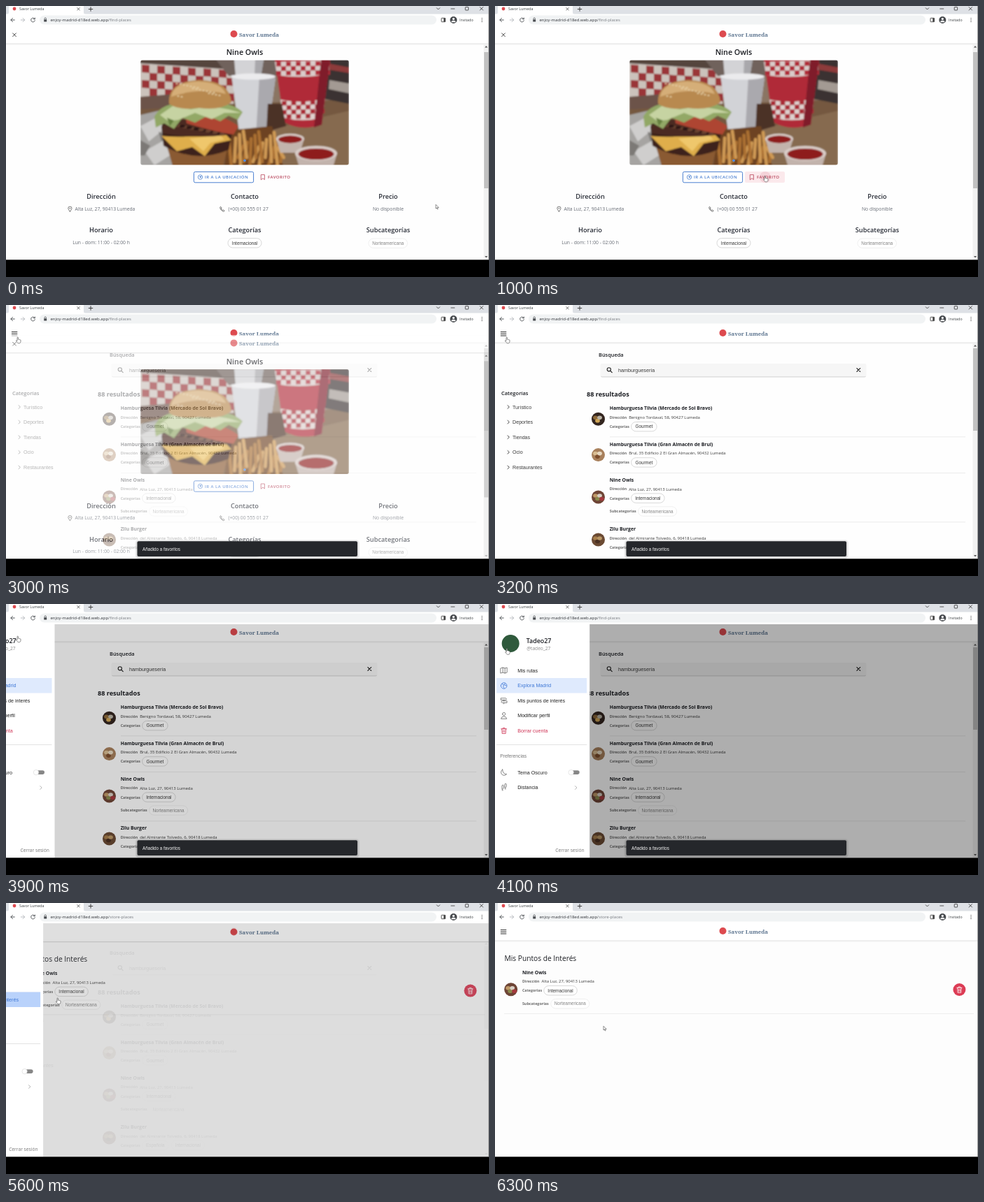
An HTML page that plays this animation: 690 px wide and 388 px high, repeating every 7 s.

```html
<!DOCTYPE html>
<html lang="es">
<head>
<meta charset="utf-8">
<title>Savor Lumeda</title>
<style>
html, body { margin: 0; width: 100%; height: 100%; overflow: hidden; background: #fff; }
svg { display: block; width: 100vw; height: 100vh; }
text { font-family: "Open Sans", "Noto Sans", sans-serif; white-space: pre; }
.ar { font-family: "Liberation Sans", Arial, sans-serif; }
.logo { font-family: "Noto Serif", serif; font-weight: 700; }
.sb { font-weight: 600; }
.bd { font-weight: 700; }
.ln { fill: none; stroke-linecap: round; stroke-linejoin: round; }
</style>
</head>
<body>
<svg id="stage" viewBox="0 0 690 388" preserveAspectRatio="none"></svg>
<script>
const stage = document.getElementById('stage');

// Markup helpers
const text = (x, y, size, str, cls = '', fill = '#1b1d22', more = '') =>
  `<text x="${x}" y="${y}" font-size="${size}" class="${cls}" fill="${fill}" ${more}>${str}</text>`;
const mid = (x, y, size, str, cls, fill) => text(x, y, size, str, cls, fill, 'text-anchor="middle"');
const rect = (x, y, w, h, fill, r = 0, more = '') =>
  `<rect x="${x}" y="${y}" width="${w}" height="${h}" rx="${r}" fill="${fill}" ${more}/>`;
const disc = (x, y, r, fill, more = '') => `<circle cx="${x}" cy="${y}" r="${r}" fill="${fill}" ${more}/>`;
const oval = (x, y, rx, ry, fill) => `<ellipse cx="${x}" cy="${y}" rx="${rx}" ry="${ry}" fill="${fill}"/>`;
const line = (d, color = '#222', w = 1) => `<path class="ln" d="${d}" stroke="${color}" stroke-width="${w}"/>`;
const shape = (d, fill) => `<path d="${d}" fill="${fill}"/>`;
const group = (id, body) => `<g id="${id}">${body}</g>`;
const cross = (x, y, r, color, w) => line(`M${x - r} ${y - r}l${2 * r} ${2 * r}m0 ${-2 * r}l${-2 * r} ${2 * r}`, color, w);

function chip(x, y, w, label, soft) {
  return rect(x, y, w, 13.4, '#fff', 6.7, `stroke="${soft ? '#ebebeb' : '#cfcfcf'}" stroke-width=".8"`) +
    mid(x + w / 2, y + 9, 6.35, label, 'ar', soft ? '#858585' : '#383838');
}

function browser() {
  let s = rect(0, 0, 690, 12, '#dee1e6') + rect(0, 11.5, 690, 17.5, '#fff');
  s += shape('M1 12Q4 12 4 9V0H111V9Q111 12 114 12Z', '#fff');
  s += disc(12, 4, 2.4, '#dd4a4f') + text(19, 6.2, 5.3, 'Savor Lumeda', '', '#3c4043');
  s += cross(103.5, 4.3, 1.7, '#444', .8) + line('M118.2 4.5h5.6M121 1.7v5.6', '#333', .9);
  s += line('M615.3 2.8l2.2 2.2 2.2-2.2M635.8 4h5', '#333', .8);
  s += rect(656.2, 1.6, 4.4, 4.4, 'none', .5, 'stroke="#333" stroke-width=".8"') + cross(679.3, 3.8, 2.2, '#333', .8);
  s += line('M12.3 20H7m2.5-2.6L6.9 20l2.6 2.6', '#45484c', .9);
  s += line('M21.3 20h5.4m-2.6-2.6l2.6 2.6-2.6 2.6', '#b3b6ba', .9);
  s += line('M41 18.4a2.9 2.9 0 1 0 .4 2.3M41.3 17v1.8h-1.8', '#45484c', .9);
  s += rect(48, 13.5, 567, 13, '#f1f3f4', 6.5);
  s += rect(54.2, 19.2, 4, 3.2, '#4a4d51', .5) + line('M55 19v-1a1.2 1.2 0 0 1 2.4 0v1', '#4a4d51', .7);
  s += text(63.5, 22.3, 6.02, 'enjoy-madrid-d18ed.web.app<tspan id="path" fill="#777b80"></tspan>', '', '#303338');
  s += rect(622, 17.3, 5.6, 5.4, 'none', .5, 'stroke="#444" stroke-width=".9"') + rect(625.2, 17.3, 2.4, 5.4, '#444');
  s += disc(639.3, 20, 5, '#46494d') + disc(639.3, 18.4, 1.6, '#fff') + shape('M636.2 23.2a3.1 2.4 0 0 1 6.2 0Z', '#fff');
  s += text(648, 22, 5.2, 'Invitado', '', '#3c4043');
  return s + [17.6, 20, 22.4].map(y => disc(680, y, .7, '#444')).join('');
}

function header(icon) {
  const mark = icon === 'x' ? cross(12, 41.3, 2.4, '#333', .9) : line('M8.3 38.6h7.6M8.3 41.3h7.6M8.3 44h7.6', '#222', 1);
  return rect(0, 29, 690, 25, '#fff') + rect(0, 53.6, 690, .9, '#d6d6d6') + rect(0, 54.5, 690, 1, '#f4f4f4') + mark +
    disc(325.5, 40, 5, '#dd4a4f') + text(333, 43.8, 7.8, 'Savor Lumeda', 'logo', '#5d7590');
}

const scrollbar = (top, h) => rect(682.5, 54.6, 7, 308.4, '#f1f1f1') + rect(683, top, 6, h, '#c1c1c1') +
  shape('M684 59.4l2-2.4 2 2.4Z', '#555') + shape('M684 358l2 2.4 2-2.4Z', '#555');

// Slanted chequerboard: every other cell is filled
function checks(x, y, cols, rows, w, h, slope, color) {
  let d = '';
  for (let r = 0; r < rows; r++)
    for (let c = r % 2; c < cols; c += 2)
      d += `M${x + c * w} ${y + r * h + c * slope}l${w} ${slope}v${h}l${-w} ${-slope}z`;
  return shape(d, color);
}

function photo() {
  // Wall, counter and table
  let s = rect(192, 77, 298, 152, '#8a7464') + shape('M192 77H330V96L192 84Z', '#54443e');
  s += shape('M192 82L325 91V140H192Z', '#cbc2bb') + checks(194, 84, 12, 4, 11, 11, .7, '#9a3538');
  s += shape('M192 130L240 126 240 146 192 152Z', '#6c5249') + shape('M300 77H395V100H318Z', '#6f625c');
  s += shape('M192 148L330 140 490 134V229H192Z', '#74583f') + shape('M380 176L490 150V229H380Z', '#866a50');
  s += shape('M452 77H490V140L450 132Z', '#3a3230') + shape('M459 82l31 6v8l-30-5z', '#8d3a3a') + shape('M462 106l28 5v14l-29-6z', '#a39a93');
  s += shape('M192 156L226 148 240 172 246 229H192Z', '#a6a4a2') + shape('M192 172l26-14 8 18-22 18zM198 208l28-16 8 22-22 14z', '#cfcecd') +
    shape('M192 192l14 8-8 14h-6zM218 180l12 6-8 8z', '#7c7976');
  // Cups
  s += shape('M326 77H368L364 101H328Z', '#d3d3d6') + shape('M356 77h12l-4 24h-9z', '#a9a8ac');
  s += shape('M322 99L385 103 374 181Q352 190 333 180Z', '#d2d3d7') + shape('M362 101l23 2-11 78-17 5z', '#aaa9ae') + oval(353.5, 101, 31.5, 4.5, '#ebebed');
  s += shape('M384 77H463L451 170Q420 180 397 166Z', '#b02c37') + shape('M384 80L463 77 461 97Q424 105 387 99Z', '#d9ccca');
  s += checks(386, 80, 11, 3, 7, 6.5, -.1, '#b02c37');
  s += shape('M392 134Q424 141 456 132L452 160Q424 167 396 160Z', '#ded2cf') + checks(394, 136, 9, 4, 6.8, 6.5, -.2, '#a92a35');
  s += shape('M450 77H463L451 170 440 174Z', '#7f1f29') + shape('M374 140l20 0 6 32-28 8z', '#4b3328');
  // Fries
  s += shape('M318 178L380 172 396 229H312Z', '#6d4320');
  for (let i = 0; i < 18; i++)
    s += line(`M${322 + i * 4.4} ${229 - i % 3 * 6}L${317 + i * 4.2 + i * 7 % 17} ${178 + i * 11 % 27}`, i % 2 ? '#cf9a55' : '#aa6f33', 4.5);
  // Sauce
  for (const [x, y, r] of [[406, 190, 20], [443, 211, 30]])
    s += shape(`M${x - r} ${y}L${x - r * .7} ${y + r}H${x + r * .7}L${x + r} ${y}Z`, '#c2b3ac') + oval(x, y, r, r * .36, '#d9cdc8') + oval(x, y + 1, r * .85, r * .27, '#8e1a1f');
  // Burger
  s += shape('M230 200Q272 216 318 198L310 229H238Z', '#8a5a30');
  s += shape('M222 172Q270 160 324 178L318 206Q270 226 225 200Z', '#3c231a');
  s += shape('M222 186Q254 190 312 182L322 192 298 197 284 215 266 202 244 208Z', '#dfae4c') + shape('M262 190l44-5 6 6-20 5-10 12z', '#efc76c');
  s += shape('M222 164Q276 158 320 174L314 185Q268 190 224 182Z', '#4b2c20');
  for (let i = 0; i < 16; i++) s += oval(228 + i * 37 % 84, 168 + i * 7 % 16, 4, 2, i % 2 ? '#6b4331' : '#2c1913');
  s += shape('M256 154Q306 151 332 172L325 184Q298 180 258 168Z', '#ae4530');
  s += shape('M212 158Q224 135 270 138 320 134 338 152L331 163 318 157 306 165 288 157 270 167 252 160 240 176 226 168 214 174Z', '#92a866');
  s += shape('M220 156l20-14 24 6 26-5 28 5 18 5-24 0-18 9-24-9-24 10-14 2z', '#c6d3a2') + shape('M230 160l10 4-6 8z', '#66803f');
  s += shape('M233 140Q230 108 276 106 320 107 322 138 306 150 276 146 246 150 233 140Z', '#b88950') + shape('M236 130Q238 110 274 108 308 109 314 126 276 116 236 130Z', '#d5ae78');
  for (let i = 0; i < 20; i++) s += oval(244 + i * 23 % 64, 111 + i * 7 % 20, 1.5, .9, '#e8d2a8');
  return `<clipPath id="frame">${rect(192, 77.5, 298, 150, '#000', 3)}</clipPath>
    <filter id="soft"><feGaussianBlur stdDeviation="1"/></filter>
    <g clip-path="url(#frame)"><g filter="url(#soft)">${s}</g></g>` + disc(341, 221.3, 1.8, '#4d8df0');
}

function detail() {
  const grey = '#666b74', blue = '#4a7fd0', red = '#b8445a';
  let s = rect(0, 29, 690, 334, '#fefefe') + header('x') + scrollbar(66, 195) + mid(341, 70.3, 10.75, 'Nine Owls', 'sb') + photo();
  s += rect(268.4, 237.4, 85.2, 15.4, '#fff', 2, `stroke="${blue}" stroke-width="1"`);
  s += disc(277.5, 245, 3.2, 'none', `stroke="${blue}" stroke-width=".8"`) + shape('M279.3 243.2l-1.2 3.6-.8-1.6-1.6-.8z', blue);
  s += text(284, 247.2, 6, 'IR A LA UBICACIÓN', 'sb', blue, 'letter-spacing=".45"');
  s += rect(357, 237, 57, 16, '#fbe9ec', 2, 'id="hover"') + disc(386, 245, 8, '#e9a9b5', 'id="ripple"');
  s += line('M364.6 241.6h4.8v7l-2.4-1.9-2.4 1.9z', red, .8) + text(374, 247.2, 6, 'FAVORITO', 'sb', red, 'letter-spacing=".45"');
  [['Dirección', 'Contacto', 'Precio'], ['Horario', 'Categorías', 'Subcategorías']].forEach((row, r) =>
    row.forEach((label, c) => s += mid(136 + c * 205, 276.2 + r * 48, 9.2, label, 'sb', '#272b35')));
  s += line('M91.4 294.2q-2.6-3.1-2.6-4.5a2.6 2.6 0 0 1 5.2 0q0 1.4-2.6 4.5z', '#555', .8) + disc(91.4, 289.8, .8, '#555');
  s += text(98.5, 293, 6.75, 'Alta Luz, 27, 90413 Lumeda', '', grey);
  s += line('M306 287.6q-1.2 1 .6 3.5t4 3.2q1 .1 1.5-1.2l-1.5-1.2-1.1.7q-1.8-1.2-2.2-2.6l.7-.8z', '#555', .8);
  s += text(317.5, 293, 6.75, '(+00) 00 555 01 27', '', grey) + mid(546, 293, 6.8, 'No disponible', '', grey);
  s += mid(136, 341, 6.75, 'Lun - dom: 11:00 - 02:00 h', '', grey);
  return s + chip(317, 332.6, 48, 'Internacional') + chip(518, 333, 55.5, 'Norteamericana', true);
}

// Round thumbnail: base tone plus a few blobs
function thumb(x, y, tones) {
  let s = disc(x, y, 9.5, tones[0]);
  tones.slice(1).forEach((c, i) => s += oval(x - 4 + i * 3, y + (i % 2 ? 2.5 : -2), 3.4, 2.8, c));
  return s;
}

function place(y, name, address, chips, sub, tones) {
  let s = text(163.7, y + 2.4, 6.8, name, 'bd') + thumb(147.5, y + (sub ? 24.5 : 15.3), tones);
  s += text(163.7, y + 14.8, 5.25, 'Dirección', 'bd', '#6a6a6a') + text(191.2, y + 15, 5.95, address, '', '#3a3a3a');
  s += text(163.7, y + 28, 5.3, 'Categorías', 'bd', '#6a6a6a');
  let x = 194.6;
  for (const [label, w] of chips) { s += chip(x, y + 19.4, w, label); x += w + 4; }
  if (sub) s += text(163.7, y + 46.8, 5.4, 'Subcategorías', 'bd', '#6a6a6a') + chip(204.6, y + 38.3, 55, sub, true);
  return s;
}

const owls = y => place(y, 'Nine Owls', 'Alta Luz, 27, 90413 Lumeda', [['Internacional', 47.5]], 'Norteamericana', ['#6e4536', '#c09a68', '#8b8a4c', '#d8cfc4', '#a5393d']);

function list() {
  let s = rect(0, 29, 690, 334, '#fefefe') + header('menu') + scrollbar(62, 118);
  s += text(148, 73.6, 7.4, 'Búsqueda', 'sb');
  s += rect(151, 85, 379, 18.5, '#d9d9d9', 2) + rect(150.5, 84, 380, 18.3, '#f6f6f6', 2);
  s += disc(162.8, 92.3, 2.6, 'none', 'stroke="#222" stroke-width="1.1"') + line('M164.8 94.3l2.4 2.4', '#222', 1.2);
  s += text(176, 95.8, 7.2, 'hamburguesería', 'ar', '#3a3a3a') + cross(519.3, 93, 2.4, '#222', 1.2);
  s += text(9, 129, 7.5, 'Categorías', 'sb');
  ['Turístico', 'Deportes', 'Tiendas', 'Ocio', 'Restaurantes'].forEach((label, i) => {
    const y = 146 + i * 21.6;
    s += line(`M18 ${y - 2.3}l2.4 2.3-2.4 2.3`, '#333', .9) + text(25, y + 2.6, 7.15, label, 'ar', '#3a3a3a');
  });
  s += text(131, 130.5, 9.1, '88 resultados', 'bd');
  s += place(148, 'Hamburguesa Tilvia (Mercado de Sol Bravo)', 'Benigno Tordaval, 58, 90427 Lumeda', [['Gourmet', 36.5]], '', ['#33251f', '#8e6a3a', '#d0a657', '#b9b2a5']);
  s += place(199.3, 'Hamburguesa Tilvia (Gran Almacén de Brul)', 'Brul, 35 Edificio 2 El Gran Almacén, 90432 Lumeda', [['Gourmet', 36.5]], '', ['#a8805c', '#d9bd92', '#7d4d2c', '#e6d8c2']);
  s += owls(250.5);
  s += place(320.7, 'Zilu Burger', 'del Almirante Tolvedo, 6, 90418 Lumeda', [['Española', 37.5], ['Internacional', 47.5]], '', ['#6b4a33', '#a87f4c', '#4a3022', '#b99766']);
  return s + [188.5, 240, 310.5].map(y => rect(164, y, 508, .8, '#e6e6e6')).join('');
}

function saved() {
  let s = rect(0, 29, 690, 334, '#fdfdfd') + header('menu') + text(13.5, 82.5, 10.2, 'Mis Puntos de Interés');
  s += `<g transform="translate(-124.8 -151.3)">${owls(250.5)}</g>` + rect(13, 158, 671, .8, '#ececec');
  return s + disc(663.4, 124, 9, '#dc3c55') +
    line('M659.8 121.3h7.2M662 121.3v-1.3h2.8v1.3M660.6 121.5l.5 6.9h4.6l.5-6.9M662.4 123.3v3.3M664.4 123.3v3.3', '#fff', .8);
}

const rowTop = i => 84.5 + 21.5 * i;
const items = ['Mis rutas', 'Explora Madrid', 'Mis puntos de interés', 'Modificar perfil', 'Borrar cuenta'];
const icons = [
  'M9 92l3-1 3 1 3-1v7l-3 1-3-1-3 1zM12 91v7M15 92v7',
  'M9.2 117a4.3 4.3 0 1 0 8.6 0a4.3 4.3 0 1 0-8.6 0M10.5 114.5l3 1-1 2.5 1.5 2.5M15 113.5l-.5 2.5 2.5 1',
  'M9.5 134.8h6.5l1.5 1.3-1.5 1.3h-6.5zM17.5 138.8h-6.5l-1.5 1.3 1.5 1.3h6.5zM13.5 137.4v1.4M13.5 141.4v1.6',
  'M11.5 157.5a2 2.2 0 1 0 4 0a2 2.2 0 1 0-4 0M9.5 164q.5-3 4-3t4 3z',
  'M9.5 178.8h8M12 178.8v-1.3h3v1.3M10.5 179l.5 6.5h5l.5-6.5M12.5 180.7v3M14.5 180.7v3'];

function menu() {
  let s = rect(0, 29, 136, 334, '#fff') + disc(23, 56.5, 12.5, '#2f5a3c');
  s += text(45.5, 56.2, 8.9, 'Tadeo27', 'sb') + text(46, 66.3, 6.6, '@tadeo_27', '', '#8a8a8a');
  s += rect(3, 0, 129, 21.5, '#f3f3f3', 0, 'id="over"') + rect(3, 0, 129, 21.5, '#dfeafd', 0, 'id="picked"');
  items.forEach((label, i) => {
    const danger = i === 4;
    s += `<path class="ln ico" d="${icons[i]}" stroke="${danger ? '#cf3657' : '#666'}" stroke-width=".8"/>`;
    s += text(33, rowTop(i) + 13.3, 7.15, label, 'ar item', danger ? '#cf3657' : '#222');
  });
  s += rect(3, 201.2, 129, .8, '#dcdcdc') + text(8, 219.5, 6.75, 'Preferencias', 'ar', '#777');
  s += line('M11.5 237a4.5 4.5 0 1 0 6 6.5q-5.5 .5-6-6.5z', '#666', .8);
  s += line('M10.8 265v-4q0-2 1.2-2t1.2 2.5-1 3.5zM14.8 263v-4q0-2 1.2-2t1.2 2.5-1 3.5zM11 266.8h1.2M15 264.8h1.2', '#666', .8);
  s += text(33, 243.7, 7.15, 'Tema Oscuro', 'ar', '#222') + text(33, 265.2, 7.15, 'Distancia', 'ar', '#222');
  s += rect(107.5, 238.3, 14, 5.6, '#868686', 2.8) + disc(109.5, 241.1, 3.7, '#fff', 'stroke="#ccc" stroke-width=".5"');
  return s + line('M115.3 260.6l2.4 2.4-2.4 2.4', '#aaa', .9) + text(87, 354.5, 6.7, 'Cerrar sesión', '', '#777');
}

const shadow = [1, 2, 3].map(d => rect(187.5 - d, 339 - d, 314.5 + 2 * d, 21.5 + 2 * d, '#000', 2 + d, 'opacity=".05"')).join('');
const toast = shadow + rect(187.5, 338.2, 314.5, 21.8, '#25272b', 2) + text(195, 352, 6.3, 'Añadido a favoritos', 'ar', '#f4f4f4');
const outline = 'fill="#fff" stroke="#444" stroke-width=".6" stroke-linejoin="round"';
const arrow = `<path d="M0 .3V6L1.3 4.9 2.3 7 3.2 6.600 2.300 4.500H4.200Z" ${outline}/>`;
const hand = `<path d="M0 .8Q.1 0 .7 0T1.4 .8V3.2Q2.4 2.7 2.7 3.5 3.5 3.1 3.9 3.9 5 3.6 5 4.7V6.3Q4.9 8.2 3.7 8.6H1.2Q-.2 7.6-1.7 5.2-1.5 4.1 0 5.3Z" ${outline}/>`;

stage.innerHTML = group('list', list()) + group('saved', saved()) + group('detail', detail()) +
  rect(0, 29, 690, 334, '#000', 0, 'id="shade"') + group('menu', menu()) + group('toast', toast) +
  browser() + rect(689.3, 0, .7, 363, '#777') + rect(0, 363.3, 690, 24.7, '#000') + group('arrow', arrow) + group('hand', hand);

const el = {};
stage.querySelectorAll('[id]').forEach(n => el[n.id] = n);
const labels = stage.querySelectorAll('.item'), marks = stage.querySelectorAll('.ico');

// Motion
const clamp = v => Math.min(1, Math.max(0, v));
const part = (t, from, span) => clamp((t - from) / span);
const out = (u, power) => 1 - (1 - u) ** power;
const smooth = u => u * u * (3 - 2 * u);
const track = [[0, 614, 284], [800, 385, 243], [1600, 385, 244], [1700, 385, 244], [2400, 16, 48], [2700, 16, 46], [3900, 16, 46],
  [4500, 17, 114], [4800, 50, 154], [5100, 73, 136], [5600, 73, 136], [6200, 154.5, 175.5], [6300, 155, 176]];

function pointer(t) {
  const i = track.findIndex(k => k[0] > t);
  if (i < 0) return track[track.length - 1].slice(1);
  const a = track[i - 1], b = track[i], u = smooth(part(t, a[0], b[0] - a[0]));
  return [a[1] + (b[1] - a[1]) * u, a[2] + (b[2] - a[2]) * u];
}

const show = (n, opacity) => {
  n.setAttribute('opacity', opacity);
  n.setAttribute('visibility', opacity > 0 ? 'visible' : 'hidden');
};
const move = (n, x, y) => n.setAttribute('transform', `translate(${x} ${y})`);

function draw(t) {
  const [x, y] = pointer(t);
  const left = out(part(t, 2960, 200), 2);
  const open = t < 5480 ? out(part(t, 3830, 330), 3) : 1 - out(part(t, 5480, 320), 2);
  const enter = out(part(t, 5480, 215), 3);
  const stored = t >= 5500;

  show(el.detail, 1 - left);
  move(el.detail, 0, 40 * left);
  show(el.saved, enter);
  move(el.saved, 0, 18 * (1 - enter));
  show(el.list, enter < 1 ? 1 : 0);
  show(el.shade, .32 * open);
  show(el.menu, open > 0 ? 1 : 0);
  move(el.menu, 136 * (open - 1), 0);
  show(el.toast, part(t, 1050, 400) * (1 - part(t, 4550, 300)));

  const press = part(t, 950, 400);
  show(el.hover, t >= 700 && t < 1900 ? 1 : 0);
  show(el.ripple, press > 0 && press < 1 ? .4 * (1 - press) : 0);

  const picked = stored ? 2 : 1, row = Math.floor((y + 3 - rowTop(0)) / 21.5);
  el.picked.setAttribute('y', rowTop(picked));
  el.picked.setAttribute('fill', stored ? '#b9d2fb' : '#dfeafd');
  show(el.over, t > 4200 && row >= 0 && row < 5 ? 1 : 0);
  el.over.setAttribute('y', rowTop(row));
  for (let i = 0; i < 4; i++) {
    labels[i].setAttribute('fill', i === picked ? '#3f78d6' : '#222');
    marks[i].setAttribute('stroke', i === picked ? '#3f78d6' : '#666');
  }
  el.path.textContent = stored ? '/store-places' : '/find-places';

  const pointing = t >= 700 && t < 1900 || t >= 2400 && t < 5700;
  show(el.hand, pointing ? 1 : 0);
  show(el.arrow, pointing ? 0 : 1);
  move(el.hand, x, y);
  move(el.arrow, x, y);
}

// The screen refreshes ten times a second
const start = performance.now();
function tick() {
  draw(Math.floor((performance.now() - start) % 7000 / 100) * 100);
  requestAnimationFrame(tick);
}
tick();
</script>
</body>
</html>
```
